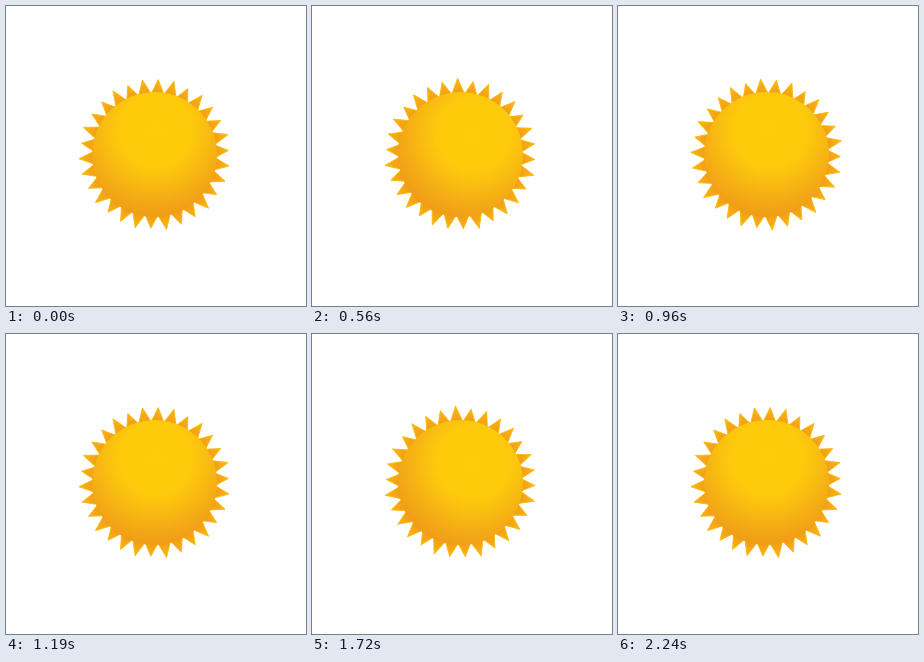
Animation of 300 by 300 pixels, one loop 2.28 s. Source, as an HTML page with a canvas:

```html
<!DOCTYPE html>
<html lang="en">
<head>
<meta charset="utf-8">
<title>Rocking sun</title>
<style>
html, body { margin: 0; height: 100%; overflow: hidden; background: #fff; }
canvas { display: block; }
</style>
</head>
<body>
<canvas id="stage" width="300" height="300"></canvas>
<script>
const ctx = document.getElementById('stage').getContext('2d');
const LOOP = 2280, HOLD = 100, STEP = 42, SWING_STEPS = 25;
const RAYS = 30, RAD = Math.PI / 180;

function radial(y, r0, r1, stops) {
  const g = ctx.createRadialGradient(0, y, r0, 0, y, r1);
  stops.forEach(([at, color]) => g.addColorStop(at, color));
  return g;
}

const rayFill = radial(0, 61, 77, [[0, '#f19e17'], [0.5, '#f6ab15'], [1, '#fbbf0e']]);
const bodyFill = radial(-24, 0, 87, [[0, '#fecc0a'], [0.42, '#fdca0b'],
  [0.6, '#f9bc11'], [0.8, '#f4ab15'], [1, '#ef9b18']]);

// The sun rocks in even steps; the first pose is held for a moment.
function angleAt(t) {
  const step = Math.floor((t < HOLD ? 0 : t) / STEP + 0.2);
  const phase = (step - 39) / SWING_STEPS * 2 * Math.PI;
  return 18 + 16.3 * Math.cos(phase);
}

function point(r, deg) {
  ctx.lineTo(r * Math.sin(deg * RAD), -r * Math.cos(deg * RAD));
}

function draw(t) {
  ctx.fillStyle = '#fff';
  ctx.fillRect(0, 0, 300, 300);
  ctx.save();
  ctx.translate(148.5, 148.5);
  ctx.rotate(angleAt(t) * RAD);

  ctx.beginPath();
  for (let i = 0; i < RAYS; i++) {
    const a = i * 360 / RAYS;
    point(61, a - 5.9);
    point(75 + 1.2 * Math.sin(i * 2.4), a);
    point(61, a + 5.9);
  }
  ctx.closePath();
  ctx.fillStyle = rayFill;
  ctx.fill();
  ctx.strokeStyle = '#f8ba10';
  ctx.lineWidth = 0.9;
  ctx.stroke();

  ctx.beginPath();
  ctx.arc(0, 0, 62.5, 0, 2 * Math.PI);
  ctx.fillStyle = bodyFill;
  ctx.fill();
  ctx.restore();
}

const start = performance.now();
function tick() {
  draw((performance.now() - start) % LOOP);
  requestAnimationFrame(tick);
}
tick();
</script>
</body>
</html>
```
